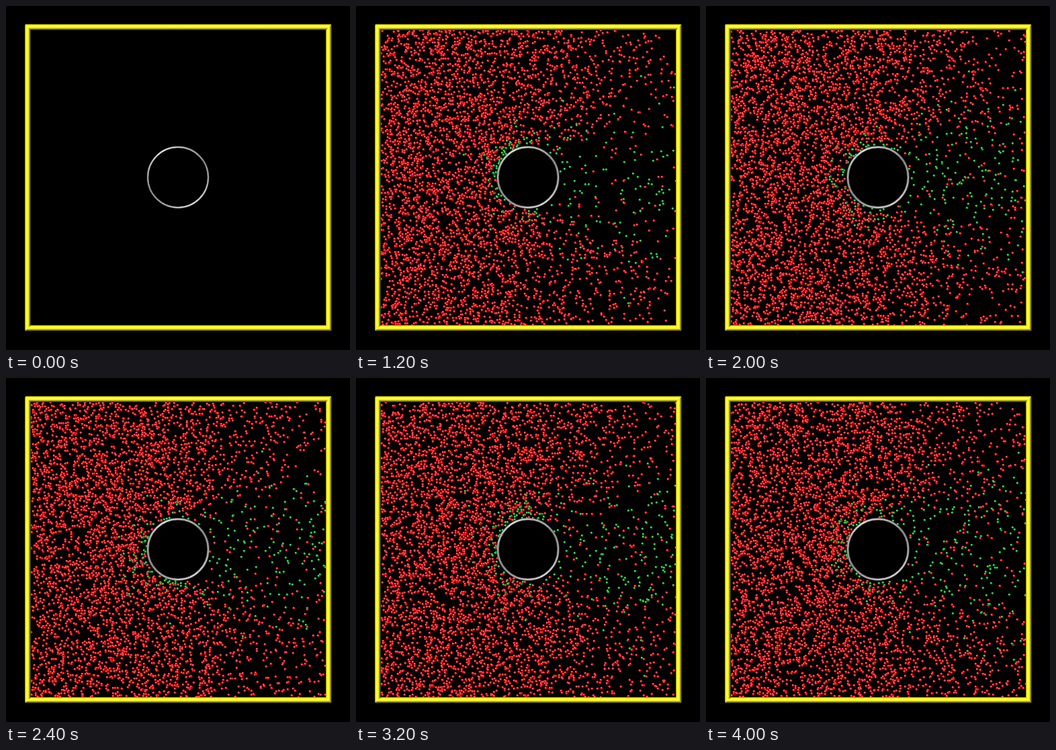
An HTML page with a canvas for the animation above (4.2 s loop, 512 by 512 pixels).

```html
<!DOCTYPE html>
<html lang="en">
<head>
<meta charset="utf-8">
<title>Gas flow past a cylinder</title>
<style>
  html, body { margin: 0; width: 100%; height: 100%; overflow: hidden; background: #000; }
  canvas { display: block; width: 512px; height: 512px; }
</style>
</head>
<body>
<canvas id="stage" width="512" height="512"></canvas>
<script>
const ctx = document.getElementById('stage').getContext('2d');
const LOOP = 4200, STEP = 200;
const BOX = { x: 37, y: 36, size: 439 };
const HOLE = { x: 256, y: 255, r: 45 };
const COUNT = 9600;

let seed = 20471;
function rand() {
  seed = (seed + 0x6D2B79F5) | 0;
  let n = Math.imul(seed ^ (seed >>> 15), 1 | seed);
  n = (n + Math.imul(n ^ (n >>> 7), 61 | n)) ^ n;
  return ((n ^ (n >>> 14)) >>> 0) / 4294967296;
}
const rayleigh = () => Math.sqrt(-2 * Math.log(1 - rand()));
const sigmoid = v => 1 / (1 + Math.exp(-v));

// Every molecule waits left of the box and enters at its own speed (px/s).
const gas = Array.from({ length: COUNT }, () => ({
  x: -rand() * BOX.size,
  y: rand() * BOX.size,
  vx: 350 * rayleigh(),
  vy: 150 * rayleigh() * Math.cos(rand() * 2 * Math.PI),
  rank: rand()
}));

// Share of fresh (red) and rebounded (green) molecules at a place.
function density(x, y) {
  const dx = x - HOLE.x, dy = Math.abs(y - HOLE.y);
  const r = Math.hypot(dx, dy);
  if (r < HOLE.r + 2) return [0, 0];
  const gap = r - HOLE.r;
  const front = sigmoid((10 - dx) / 12);

  const spread = 0.25 + 0.75 * sigmoid((318 - x) / 45);
  const half = 60 + 0.3 * Math.max(dx, 0);
  const depth = 0.95 - 0.002 * Math.max(dx - 44, 0);
  const shadow = depth * sigmoid((dx - 14) / 12) * Math.exp(-((dy / half) ** 4));
  const bow = 0.25 * front * Math.exp(-((gap / 50) ** 2));
  const near = 1 - 0.75 * Math.exp(-((gap / 10) ** 2));
  const red = (0.73 * spread * (1 - shadow) + bow) * near;

  const wakeHalf = 50 + 0.3 * Math.max(dx, 0);
  const wake = 0.13 * sigmoid((dx - 20) / 12) * Math.exp(-((dy / wakeHalf) ** 2));
  const green = 0.9 * front * Math.exp(-gap / 12) + wake;
  return [red, green];
}

function ball(radius, rim, body, shine) {
  const c = document.createElement('canvas');
  c.width = c.height = 6;
  const g = c.getContext('2d');
  const disc = (x, y, r, fill) => {
    g.fillStyle = fill;
    g.beginPath();
    g.arc(x, y, r, 0, 2 * Math.PI);
    g.fill();
  };
  disc(2.5, 2.5, radius, rim);
  disc(2.3, 2.3, radius - 0.5, body);
  disc(2, 2, 0.75, shine);
  return c;
}
const redBall = ball(2, '#a40000', '#ff0c12', '#ffd4d4');
const greenBall = ball(1.9, '#005a10', '#0abc2c', '#b8f4c0');

function drawGas(t) {
  ctx.save();
  ctx.beginPath();
  ctx.rect(BOX.x, BOX.y, BOX.size, BOX.size);
  ctx.clip();
  for (const p of gas) {
    const run = p.x + p.vx * t;
    if (run < 0 || t === 0) continue;
    const x = BOX.x + run % BOX.size;
    // Top and bottom walls reflect.
    const span = 2 * BOX.size;
    const fold = (((p.y + p.vy * t) % span) + span) % span;
    const y = BOX.y + (fold < BOX.size ? fold : span - fold);
    const [red, green] = density(x, y);
    if (p.rank >= red + green) continue;
    ctx.drawImage(p.rank < red ? redBall : greenBall, Math.round(x) - 2, Math.round(y) - 2);
  }
  ctx.restore();
}

function bar(points, x0, y0, x1, y1) {
  const fill = ctx.createLinearGradient(x0, y0, x1, y1);
  [[0, '#8c8610'], [0.16, '#eee820'], [0.32, '#ffff3c'],
   [0.58, '#fbf722'], [0.78, '#949000'], [1, '#141400']]
    .forEach(([at, color]) => fill.addColorStop(at, color));
  ctx.fillStyle = fill;
  ctx.beginPath();
  points.forEach(([x, y]) => ctx.lineTo(x, y));
  ctx.fill();
}

function drawFrame() {
  const l = 28, t = 27, r = 485, b = 484, w = 9;
  ctx.save();
  ctx.beginPath();
  ctx.roundRect(l, t, r - l, b - t, 3);
  ctx.clip();
  bar([[l, t], [l + w, t], [l + w, b], [l, b]], l, 0, l + w, 0);
  bar([[r - w, t], [r, t], [r, b], [r - w, b]], r - w, 0, r, 0);
  bar([[l, t], [r, t], [r - w, t + w], [l + w, t + w]], 0, t, 0, t + w);
  bar([[l, b], [r, b], [r - w, b - w], [l + w, b - w]], 0, b - w, 0, b);
  ctx.restore();
}

function ring(width, bright, dim) {
  const shade = ctx.createConicGradient(Math.PI / 3, HOLE.x, HOLE.y);
  [bright, dim, bright, dim, bright].forEach((c, i) => shade.addColorStop(i / 4, c));
  ctx.strokeStyle = shade;
  ctx.lineWidth = width;
  ctx.beginPath();
  ctx.arc(HOLE.x, HOLE.y, HOLE.r, 0, 2 * Math.PI);
  ctx.stroke();
}

function draw(step) {
  ctx.fillStyle = '#000';
  ctx.fillRect(0, 0, 512, 512);
  drawGas(step * STEP / 1000);
  drawFrame();
  if (step > 0) {
    ring(3.6, '#606060', '#4c4c4c');
    ring(1.9, '#e0e0e0', '#909090');
  } else {
    ring(2.8, '#666', '#444');
    ring(1.5, '#f4f4f4', '#949494');
  }
}

const start = performance.now();
let shown = -1;
function tick() {
  const step = Math.floor(((performance.now() - start) % LOOP) / STEP);
  if (step !== shown) draw(shown = step);
  requestAnimationFrame(tick);
}
tick();
</script>
</body>
</html>
```
